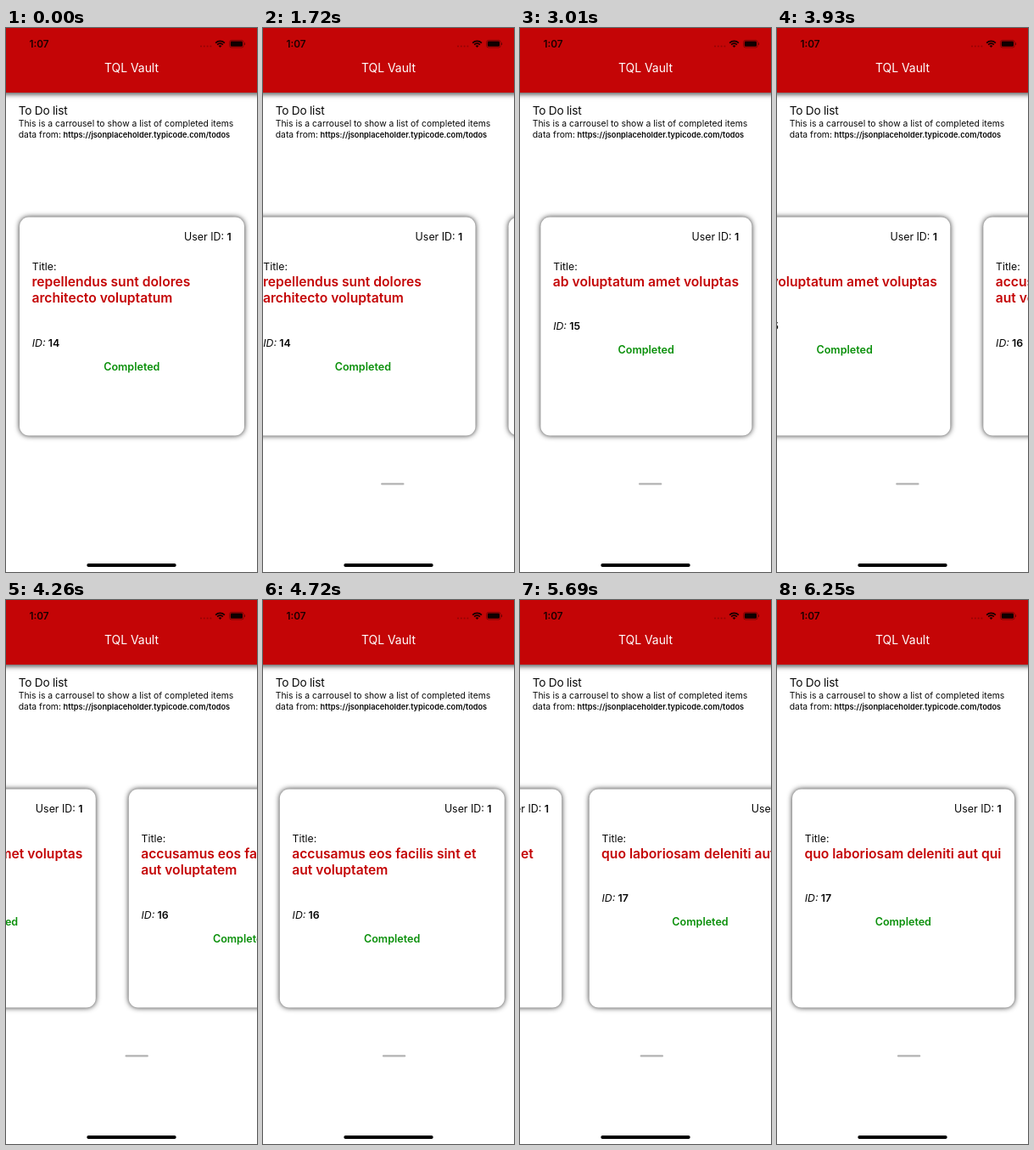
Recreate the animation shown at these times as an HTML page with a canvas. Size 296x640 px, loop 6290 ms.

```html
<!DOCTYPE html>
<html lang="en">
<head>
<meta charset="utf-8">
<title>To Do carousel</title>
<style>
html, body { margin: 0; width: 100%; height: 100%; overflow: hidden; background: #fff; }
canvas { display: block; width: 296px; height: 640px; }
</style>
</head>
<body>
<canvas id="stage"></canvas>
<script>
const W = 296, H = 640, LOOP = 6290, PAGE = 296;
const RED = '#c40506', INK = '#080808';
const canvas = document.getElementById('stage');
const ctx = canvas.getContext('2d');
const dpr = window.devicePixelRatio || 1;
canvas.width = W * dpr;
canvas.height = H * dpr;

const cards = [
  { x: 16, w: 265, id: 14, title: ['repellendus sunt dolores', 'architecto voluptatum'] },
  { x: 24, w: 249, id: 15, title: ['ab voluptatum amet voluptas'] },
  { x: 16, w: 265, id: 16, title: ['accusamus eos facilis sint et', 'aut voluptatem'] },
  { x: 17.5, w: 262, id: 17, title: ['quo laboriosam deleniti aut qui'] }
];

// Runs of screen refreshes: first time, last time, count
const runs = [
  [1720, 2300, 6], [2410, 2870, 5], [3010, 3010, 1], [3810, 4380, 6], [4500, 4840, 4],
  [5020, 5250, 3], [5360, 5580, 3], [5690, 5810, 2], [6010, 6250, 3]
];
const ticks = runs.flatMap(([a, b, n]) =>
  Array.from({ length: n }, (_, i) => n > 1 ? Math.floor((a + (b - a) * i / (n - 1)) / 10) * 10 : a));

// Each swipe is a drag up to `reach`, a short hold, then a decaying snap
const swipes = [
  { start: 1613, end: 2410, hold: 0, reach: 0.767, pow: 1, tau: 115 },
  { start: 3683, end: 4500, hold: 0, reach: 0.8, pow: 1, tau: 80 },
  { start: 4905, end: 5810, hold: 120, reach: 0.88, pow: 0.82, tau: 75 }
];

function progress(s, t) {
  if (t <= s.start) return 0;
  if (t < s.end) return s.reach * ((t - s.start) / (s.end - s.start)) ** s.pow;
  const rest = Math.max(0, t - s.end - s.hold);
  return 1 - (1 - s.reach) * Math.exp(-rest / s.tau);
}

function text(str, x, y, size, color = INK, weight = 400, align = 'left', style = 'normal') {
  ctx.font = `${style} ${weight} ${size}px Inter, Roboto, sans-serif`;
  ctx.fillStyle = color;
  ctx.textAlign = align;
  ctx.fillText(str, x, y);
  return ctx.measureText(str).width;
}

function pill(x, y, w, h, r, color) {
  ctx.fillStyle = color;
  ctx.beginPath();
  ctx.roundRect(x, y, w, h, r);
  ctx.fill();
}

function shadow(color, blur, dy = 0) {
  ctx.shadowColor = color;
  ctx.shadowBlur = blur * dpr;
  ctx.shadowOffsetY = dy * dpr;
}

function drawStatus() {
  text('1:07', 27.5, 22.8, 11.8, '#1c0000', 600);
  for (let i = 0; i < 4; i++) pill(229 + i * 3.8, 20.5, 2, 2, 1, 'rgba(40,0,0,.3)');

  ctx.strokeStyle = ctx.fillStyle = '#180000';
  ctx.lineWidth = 1.7;
  for (const r of [7.6, 4.8]) {
    ctx.beginPath();
    ctx.arc(252.5, 23, r, -Math.PI * 0.75, -Math.PI * 0.25);
    ctx.stroke();
  }
  ctx.beginPath();
  ctx.moveTo(252.5, 23);
  ctx.arc(252.5, 23, 2.7, -Math.PI * 0.75, -Math.PI * 0.25);
  ctx.fill();

  ctx.strokeStyle = 'rgba(30,0,0,.5)';
  ctx.lineWidth = 0.8;
  ctx.beginPath();
  ctx.roundRect(263.6, 14.4, 16.6, 8.6, 2.4);
  ctx.stroke();
  pill(264.8, 15.6, 14.2, 6.2, 1.4, '#100000');
  pill(281, 17.3, 1.1, 2.8, 0.5, 'rgba(30,0,0,.5)');
}

function drawHeader() {
  shadow('rgba(0,0,0,.7)', 6, 2);
  ctx.fillStyle = RED;
  ctx.fillRect(-10, -10, W + 20, 86);
  shadow('transparent', 0);
  drawStatus();
  text('TQL Vault', 148, 52.2, 13.9, '#fff', 400, 'center');
}

function drawIntro() {
  ctx.letterSpacing = '-0.25px';
  text('To Do list', 14.8, 102.1, 13.7);
  ctx.letterSpacing = '0px';
  text('This is a carrousel to show a list of completed items', 14.7, 116.3, 10.38);
  text('data from:', 14.7, 129, 10.38);
  text('https://jsonplaceholder.typicode.com/todos', 67.6, 129, 9.21, INK, 600);
}

function drawCard(card, x) {
  const left = x + 14.8, right = x + card.w - 15.2;
  shadow('rgba(0,0,0,.85)', 6);
  pill(x, 222.5, card.w, 257, 11, '#fff');
  shadow('transparent', 0);

  const one = text('1', right, 249.6, 12.4, INK, 600, 'right');
  text('User ID: ', right - one, 249.6, 12.4, INK, 400, 'right');
  text('Title:', left, 285, 12.3);
  card.title.forEach((line, i) => text(line, left - 0.4, 303.8 + i * 19.5, 15.67, RED, 600));

  const drop = (card.title.length - 1) * 19.7;
  text('ID:', left, 355.3 + drop, 12.3, INK, 400, 'left', 'italic');
  text(card.id, left + 19, 355.3 + drop, 12.4, INK, 600);
  text('Completed', x + card.w / 2 - 0.2, 382.8 + drop, 12.55, '#0b900b', 600, 'center');
}

function draw(now) {
  const t = now % LOOP;
  const tick = ticks.filter(k => k <= t).pop() || 0;
  const page = swipes.reduce((sum, s) => sum + progress(s, tick), 0);

  ctx.setTransform(dpr, 0, 0, dpr, 0, 0);
  ctx.fillStyle = '#fff';
  ctx.fillRect(0, 0, W, H);
  drawIntro();
  cards.forEach((card, i) => {
    const x = card.x + (i - page) * PAGE;
    if (x < W + 10 && x + card.w > -10) drawCard(card, x);
  });
  if (tick) pill(139 + page * 0.95, 535.3, 27.4, 2.3, 1.1, '#b2b2b2');
  drawHeader();
  pill(95.3, 630, 105.4, 4, 2, '#000');
}

function frame() {
  draw(performance.now());
  requestAnimationFrame(frame);
}
frame();
</script>
</body>
</html>
```
